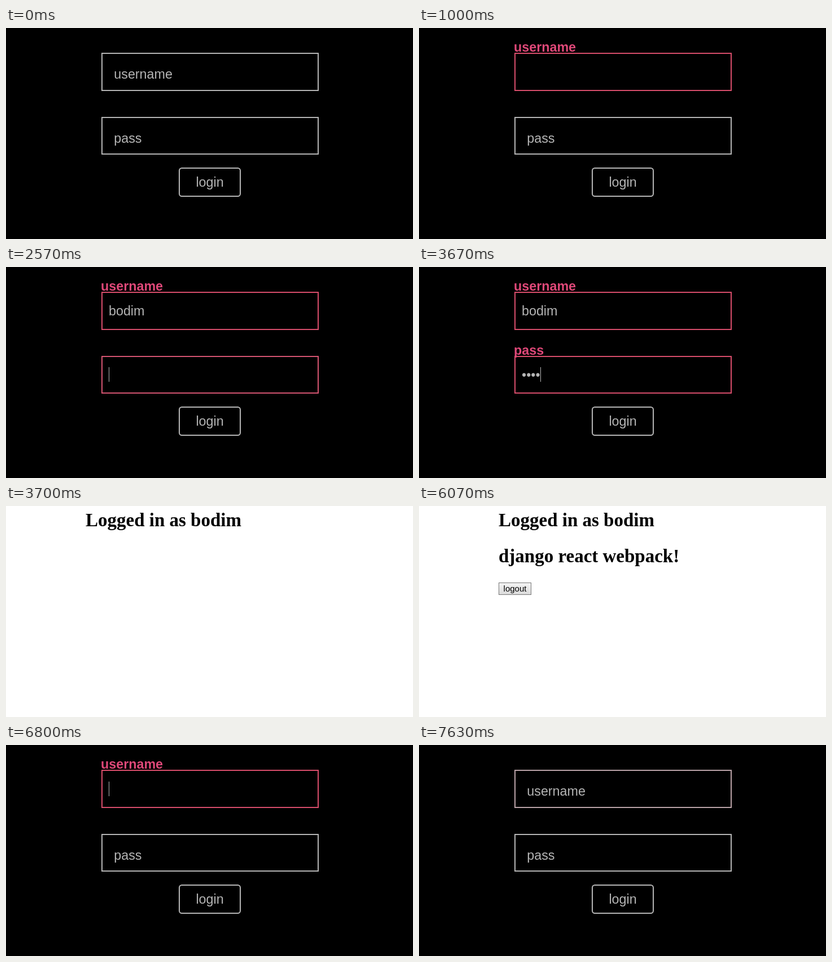
An HTML page for the animation above (7.66 s loop, 721 px wide and 375 px high).

```html
<!DOCTYPE html>
<html lang="en">
<head>
<meta charset="utf-8">
<title>Login demo</title>
<style>
  html, body { margin: 0; width: 100%; height: 100%; overflow: hidden; background: #000; }
  #stage { display: block; width: 721px; height: 375px; }
  #login { font: 23.3px "Liberation Sans", Arial, sans-serif; fill: #b5b5b5; }
  .box { fill: none; stroke: #b5b5b5; stroke-width: 2; }
  .float { font-weight: bold; fill: #de4878; }
  #menu { font: bold 14.5px "Noto Sans", "Open Sans", sans-serif; fill: #fff; }
  #home { font: bold 33px "Liberation Serif", "Times New Roman", serif; }
  #logout text { font: 15px "Liberation Sans", Arial, sans-serif; }
  text { white-space: pre; }
</style>
</head>
<body>
<svg id="stage" viewBox="0 0 721 375">
  <defs>
    <linearGradient id="face" x2="0" y2="1">
      <stop offset="0" stop-color="#f4f4f4"/><stop offset="1" stop-color="#dadada"/>
    </linearGradient>
    <linearGradient id="idle" x2="0" y2="1">
      <stop offset="0.38" stop-color="#ededed"/><stop offset="1" stop-color="#dedede"/>
    </linearGradient>
    <linearGradient id="down" x2="0" y2="1">
      <stop offset="0" stop-color="#d2d2d2"/><stop offset="1" stop-color="#e6e6e6"/>
    </linearGradient>
  </defs>
  <g id="login">
    <rect width="721" height="375" fill="#000"/>
    <g id="fields"></g>
    <rect class="box" x="307" y="249" width="108" height="50" rx="4.5"/>
    <text x="361" y="282" text-anchor="middle">login</text>
    <g id="menu"></g>
  </g>
  <g id="home">
    <rect width="721" height="375" fill="#fff"/>
    <text x="141" y="36">Logged in as bodim</text>
    <g id="late">
      <text x="141" y="100">django react webpack!</text>
      <g id="logout">
        <rect x="141.5" y="136.5" width="57" height="21" stroke="#777"/>
        <text x="170" y="152" text-anchor="middle">logout</text>
      </g>
    </g>
  </g>
</svg>
<script>
const LOOP = 7660, FADE = 250, LINE = 27, SUBMIT = 3700, LOGOUT = 6200;
const GREY = [181, 181, 181], PINK = [216, 77, 107];
const $ = id => document.getElementById(id);

const clamp = v => Math.min(1, Math.max(0, v));
const show = (el, on) => el.setAttribute("visibility", on ? "inherit" : "hidden");

// CSS cubic-bezier timing, solved by bisection
function bezier(x1, y1, x2, y2) {
  const at = (a, b, s) => 3 * a * s * (1 - s) ** 2 + 3 * b * s * s * (1 - s) + s ** 3;
  return x => {
    if (x <= 0 || x >= 1) return clamp(x);
    let lo = 0, hi = 1;
    for (let i = 0; i < 24; i++) {
      const mid = (lo + hi) / 2;
      if (at(x1, x2, mid) < x) lo = mid; else hi = mid;
    }
    return at(y1, y2, lo);
  };
}
const ease = bezier(0.25, 0.1, 0.25, 1);
const easeIn = bezier(0.42, 0, 1, 1);
const easeOut = bezier(0, 0, 0.58, 1);

function makeField(label, top, height, shift) {
  const g = document.createElementNS("http://www.w3.org/2000/svg", "g");
  g.innerHTML = `
    <rect class="box" x="170" y="${top + 1}" width="383" height="${height - 2}"/>
    <svg x="168" y="${69 + shift}" width="386" height="${LINE}"><text x="23.3" y="21">${label}</text></svg>
    <svg x="168" y="${21 + shift}" width="386" height="${LINE}"><text class="float" y="21">${label}</text></svg>
    <text x="182" y="${86.3 + shift}"></text>
    <rect y="${Math.floor(65 + shift)}" width="1" height="26"/>`;
  $("fields").append(g);
  const [box, , , value, caret] = g.children;
  const [hint, float] = g.querySelectorAll("svg text");
  return { box, hint, float, value, caret };
}

// The hint drops out of its line, then the bold label drops in above the box
function drawField(f, t, { focus, blur, text, caretOn }) {
  const active = t >= focus && t < blur;
  const p = active ? clamp((t - focus) / FADE) : 0;
  const out = easeIn(clamp(p / 0.7));
  const into = easeOut(clamp((p - 0.7) / 0.3));
  f.hint.setAttribute("transform", `translate(0 ${1.25 * LINE * out})`);
  f.hint.setAttribute("opacity", 1 - out);
  f.float.setAttribute("transform", `translate(0 ${-0.75 * LINE * (1 - into)})`);
  f.float.setAttribute("opacity", into);

  const tint = t >= blur ? 1 - ease(clamp((t - blur) / FADE)) : ease(p);
  const mix = GREY.map((c, i) => Math.round(c + (PINK[i] - c) * tint));
  f.box.style.stroke = `rgb(${mix})`;

  if (f.value.textContent !== text) f.value.textContent = text;
  const width = text ? f.value.getComputedTextLength() : 0;
  f.caret.setAttribute("x", Math.round(182 + width));
  show(f.caret, caretOn);
}

function drawMenu(items) {
  const key = items.join();
  if (drawMenu.key === key) return;
  drawMenu.key = key;
  const height = items.length * 24 + 2;
  $("menu").innerHTML = items.length
    ? `<rect x="168" y="112" width="388" height="${height}" fill="#272b2b"/>` +
      items.map((s, i) => `<text x="177" y="${130 + i * 24}">${s}</text>`).join("")
    : "";
}

const user = makeField("username", 44, 68, 0);
const pass = makeField("pass", 158, 67, 113.6);
const typed = (t, times) => times.filter(k => t >= k).length;
const within = (t, a, b) => t >= a && t < b;

function render(t) {
  const home = within(t, SUBMIT, LOGOUT);
  show($("login"), !home);
  show($("home"), home);
  if (home) {
    show($("late"), t >= 3930);
    const face = within(t, 5870, 6070) ? "down" : t >= 5130 ? "face" : "idle";
    $("logout").firstElementChild.setAttribute("fill", `url(#${face})`);
    return;
  }
  const again = t >= LOGOUT;
  const letters = again ? 0 : typed(t, [1200, 1670, 1930, 2100, 2230]);
  const dots = again ? 0 : typed(t, [2730, 2900, 3130, 3270]);
  drawField(user, t, {
    focus: again ? 6235 : 205,
    blur: again ? 7500 : Infinity,
    text: "bodim".slice(0, letters),
    caretOn: again
      ? within(t, 6230, 6830) || within(t, 7400, 7500)
      : within(t, 200, 770) || within(t, 1200, 2400)
  });
  drawField(pass, t, {
    focus: again ? Infinity : 2405,
    blur: Infinity,
    text: "•".repeat(dots),
    caretOn: within(t, 2400, SUBMIT)
  });
  drawMenu(!within(t, 1200, 2400) ? [] : letters < 2 ? ["bodim", "balto", "bexel"] : ["bodim"]);
}

const start = performance.now();
function tick() {
  render((performance.now() - start) % LOOP);
  requestAnimationFrame(tick);
}
tick();
</script>
</body>
</html>
```
